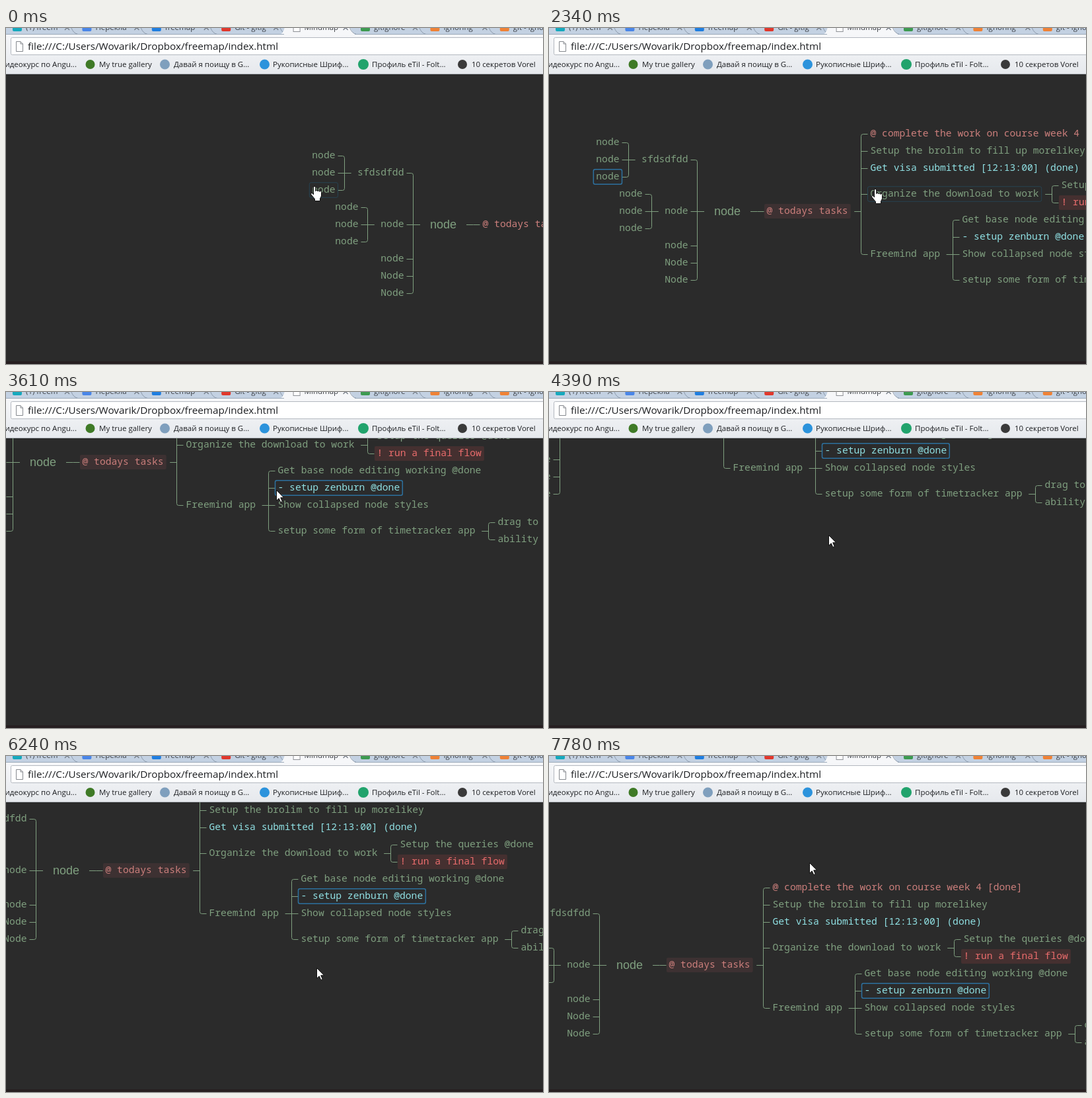
These frames come from a looping animation (813x508 px, 8 s). An HTML page:

```html
<!DOCTYPE html>
<html lang="en">
<head>
<meta charset="utf-8">
<title>Mind map</title>
<style>
  html, body { margin: 0; width: 100%; height: 100%; overflow: hidden; background: #2b2b2b; }
  svg { display: block; }
  text { white-space: pre; }
  .map text { font: 14.667px "Noto Sans Mono", monospace; }
  .map .strong { font-weight: 500; }
  .map .root { font: 18px "Liberation Sans", Arial, sans-serif; }
  .ui { font-family: "Open Sans", "Noto Sans", sans-serif; fill: #1d1f22; }
</style>
</head>
<body>
<svg id="stage" width="813" height="508" viewBox="0 0 813 508">
  <defs>
    <linearGradient id="bar" x2="0" y2="1">
      <stop stop-color="#f6f7f9"/><stop offset="1" stop-color="#e6e9ed"/>
    </linearGradient>
  </defs>
  <rect width="813" height="508" fill="#2b2b2b"/>
  <g id="map" class="map"></g>
  <rect y="504" width="813" height="4" fill="#261f21"/>
  <g id="chrome" class="ui"></g>
  <path id="arrow" d="M.5.5V16.2L4.2 12.8 6.8 18.6 9.3 17.5 6.7 11.8H11.6Z" fill="#fff" stroke="#111"/>
  <path id="hand" d="M4.5 13V2a1.6 1.6 0 0 1 3.2 0V7.6a1.6 1.6 0 0 1 3.1.3a1.6 1.6 0 0 1 3 .6a1.4 1.4 0 0 1 2.7.7V15L14.5 19V22.5H6.5V19.5L1 13a1.5 1.5 0 0 1 2-2.2Z" fill="#fff" stroke="#111"/>
</svg>
<script>
const $ = id => document.getElementById(id);
const CHAR = 8.8, ROW = 26, ROOT_WIDTH = 40, LOOP = 8000;
const GREEN = '#7f9f7f', ROSE = '#cc7f7c', RED = '#e96c6c', CYAN = '#8fdfe2';

function add(parent, tag, attrs, text) {
  const el = document.createElementNS('http://www.w3.org/2000/svg', tag);
  for (const key in attrs) el.setAttribute(key, attrs[key]);
  if (text) el.textContent = text;
  parent.append(el);
  return el;
}

// Mind map: every leaf takes one row, a parent sits in the middle of its leaves.
const node = (text, kids = [], opts = {}) => ({ text, kids, color: GREEN, ...opts });
const three = id => [node('node'), node('node'), node('node', [], { id })];

const left = [
  node('sfdsdfdd', three('third')),
  node('node', three()),
  node('node'), node('Node'), node('Node')
];
const right = [
  node('@ todays tasks', [
    node('@ complete the work on course week 4 [done]', [], { color: ROSE, id: 'complete' }),
    node('Setup the brolim to fill up morelikey'),
    node('Get visa submitted [12:13:00] (done)', [], { color: CYAN, strong: true }),
    node('Organize the download to work', [
      node('Setup the queries @done'),
      node('! run a final flow', [], { color: RED, back: '#453030', strong: true })
    ], { id: 'organize' }),
    node('Freemind app', [
      node('Get base node editing working @done', [], { id: 'base' }),
      node('- setup zenburn @done', [], { color: CYAN, id: 'zenburn', strong: true }),
      node('Show collapsed node styles'),
      node('setup some form of timetracker app', [node('drag to view'), node('ability to')])
    ])
  ], { color: ROSE, back: '#3d3132', id: 'tasks' })
];

const map = $('map');
const boxes = {};
const leaves = n => n.kids.length ? n.kids.reduce((sum, k) => sum + leaves(k), 0) : 1;

function drawNode(n, x, y) {
  const w = n.text.length * CHAR;
  if (n.back) n.backEl = add(map, 'rect', { x: x - 3.5, y: y - 11, width: w + 7.5, height: 22, rx: 2, fill: n.back });
  if (n.id) boxes[n.id] = {
    node: n,
    frame: add(map, 'rect', { x: x - 4, y: y - 11.25, width: w + 8, height: 22.5, rx: 2.5, fill: 'none' })
  };
  add(map, 'text', { x, y: y + 4, fill: n.color, class: n.strong ? 'strong' : '' }, n.text);
}

// dir is 1 to the right of the root and -1 to its left
function branch(kids, edge, y, dir, isRoot) {
  const spine = dir * (Math.floor(dir * edge + (isRoot ? 25 : 19.5)) + 0.5);
  const rows = kids.reduce((sum, k) => sum + leaves(k), 0);
  let top = y - rows * ROW / 2;
  const ys = kids.map(k => {
    const h = leaves(k) * ROW;
    top += h;
    return top - h / 2;
  });
  const end = spine + dir * 10;
  const bend = spine + dir * 3;
  const first = ys[0] + 0.5, last = ys[ys.length - 1] + 0.5;
  let d = `M${edge + dir * (isRoot ? 15 : 9.5)} ${y + 0.5}H${spine}`;
  if (kids.length === 1) d += `H${end}`;
  else {
    d += `M${end} ${first}H${bend}Q${spine} ${first} ${spine} ${first + 3}`
       + `V${last - 3}Q${spine} ${last} ${bend} ${last}H${end}`;
    ys.slice(1, -1).forEach(v => d += `M${spine} ${v + 0.5}H${end}`);
  }
  add(map, 'path', { d, fill: 'none', stroke: GREEN });
  kids.forEach((k, i) => {
    const near = spine + dir * 14, w = k.text.length * CHAR;
    drawNode(k, dir > 0 ? near : near - w, ys[i]);
    if (k.kids.length) branch(k.kids, near + dir * w, ys[i], dir);
  });
}

add(map, 'text', { class: 'root', x: 0, y: 6, fill: GREEN }, 'node');
branch(left, 0, 0, -1, true);
branch(right, ROOT_WIDTH, 0, 1, true);

// Browser window
const chrome = $('chrome');
const rect = (x, y, width, height, fill, more) => add(chrome, 'rect', { x, y, width, height, fill, ...more });
const dot = (cx, cy, r, fill) => add(chrome, 'circle', { cx, cy, r, fill });
const label = (x, y, size, text, more) => add(chrome, 'text', { x, y, 'font-size': size, ...more }, text);

rect(0, 0, 813, 10, '#c3d1e2');
const tabs = [
  ['(1) freem', '#16a9bd'], ['Перекла', '#4a86e8'], ['freemap', '#1f7ee0'], ['Git - gitig', '#e0382c'],
  ['Mindmap', ''], ['gitignore', '#3d9a50'], ['Ignoring', '#ef8236'], ['git - igno', '#ef8236']
];
tabs.forEach(([title, color], i) => {
  const x = 10 + i * 105.4;
  const active = !color;
  if (active) {
    add(chrome, 'path', { d: `M${x - 18} 10Q${x - 12} 9 ${x - 10} 0H${x + 90}Q${x + 93} 9 ${x + 100} 10Z`, fill: '#f6f7f9' });
    rect(x + 3.5, -7.5, 10, 13, '#fff', { stroke: '#8d9095' });
  } else rect(x, -8, 14, 13, color, { rx: 2 });
  label(x + 20, 3, 11.5, title, { fill: '#3c4046' });
  add(chrome, 'path', { d: `M${x + 79} -4l7 7m0 -7l-7 7`, stroke: '#777f89', 'stroke-width': 1.4 });
  add(chrome, 'path', { d: `M${x + 89} 0Q${x + 92} 8 ${x + 99} 9.5`, fill: 'none', stroke: '#8b99aa' });
});
rect(0, 9, 421, 1, '#9caaba');
rect(528, 9, 285, 1, '#9caaba');
rect(0, 10, 813, 60, 'url(#bar)');
rect(7.5, 14.5, 820, 26, '#fff', { rx: 2, stroke: '#b3b8bf' });
add(chrome, 'path', { d: 'M15.5 20.5H22L25.5 24V35.5H15.5ZM22 20.5V24H25.5', fill: '#fff', stroke: '#85898e' });
label(33, 33, 15.25, 'file:///C:/Users/Wovarik/Dropbox/freemap/index.html');
rect(0, 69, 813, 1, '#b4b8be');

const mark = (x, text) => label(x, 59, 11.5, text);
label(107, 59, 11.5, 'Видеокурс по Angu...', { 'text-anchor': 'end' });
dot(127.5, 55, 7, '#3f7a26');
mark(141, 'My true gallery');
dot(240.5, 55, 7.5, '#7f9fbd');
mark(254, 'Давай я поищу в G...');
dot(391.5, 55, 7.5, '#2c93dc');
mark(404, 'Рукописные Шриф...');
dot(541, 55, 8, '#21a36c');
mark(554, 'Профиль eTil - Folt...');
dot(691, 55, 7, '#3a3a3a');
mark(705, '10 секретов Vorel');

// time, map x, map y, pointer x, pointer y, selected, hovered, pointer is a hand
const poses = [
  [0, 642, 297, 461, 239, '', 'third', 1],
  [270, 642, 297, 461, 239, 'third', '', 1],
  [520, 642, 297, 546, 241, 'third'],
  [790, 642, 297, 659, 240, 'third'],
  [1040, 642, 297, 645, 241, 'third'],
  [1290, 642, 297, 630, 240, 'third'],
  [1560, 615, 300, 603, 243, 'third'],
  [1810, 430, 289, 425, 233, 'third'],
  [2060, 250, 277, 262, 222, 'third'],
  [2340, 250, 277, 488, 243, 'third', 'organize', 1],
  [2610, 150, 270, 390, 236, 'organize'],
  [2860, 29, 258, 330, 262, 'organize'],
  [3110, 29, 258, 399, 294, 'organize', 'base', 1],
  [3360, 29, 258, 399, 294, 'zenburn', '', 1],
  [3610, 36, 106, 409, 148, 'zenburn'],
  [3860, 40, 62, 418, 209, 'zenburn'],
  [4140, 42, 52, 421, 216, 'zenburn'],
  [4390, 42, 50, 423, 216, 'zenburn'],
  [4640, 38, 36, 423, 187, 'zenburn'],
  [5170, 38, 36, 425, 185, 'zenburn'],
  [5440, 39, 38, 432, 188, 'zenburn'],
  [5690, 40, 40, 439, 190, 'zenburn'],
  [5970, 52, 93, 451, 243, 'zenburn'],
  [6240, 71, 173, 470, 320, 'zenburn'],
  [6490, 86, 255, 485, 400, 'zenburn'],
  [6740, 92, 293, 491, 437, 'zenburn'],
  [7010, 92, 293, 452, 308, 'zenburn'],
  [7260, 92, 293, 402, 166, 'zenburn', 'complete', 1],
  [7510, 92, 293, 385, 131, 'zenburn'],
  [7780, 102, 316, 394, 161, 'zenburn']
];

function render(time) {
  const [start, x, y, px, py, selected, hovered, isHand] = poses.findLast(p => p[0] <= time);
  map.setAttribute('transform', `translate(${x} ${y})`);
  for (const id in boxes) {
    const { frame } = boxes[id];
    const isSelected = id === selected;
    frame.setAttribute('stroke', isSelected ? '#2d719f' : id === hovered ? '#264352' : 'none');
    frame.setAttribute('stroke-width', isSelected ? 1.5 : 1);
  }
  boxes.tasks.node.backEl.style.visibility = start ? 'visible' : 'hidden';
  for (const id of ['arrow', 'hand']) {
    $(id).setAttribute('transform', `translate(${px} ${py})`);
    $(id).style.display = (id === 'hand') === !!isHand ? '' : 'none';
  }
}

function tick() {
  render(performance.now() % LOOP);
  requestAnimationFrame(tick);
}
tick();
</script>
</body>
</html>
```
